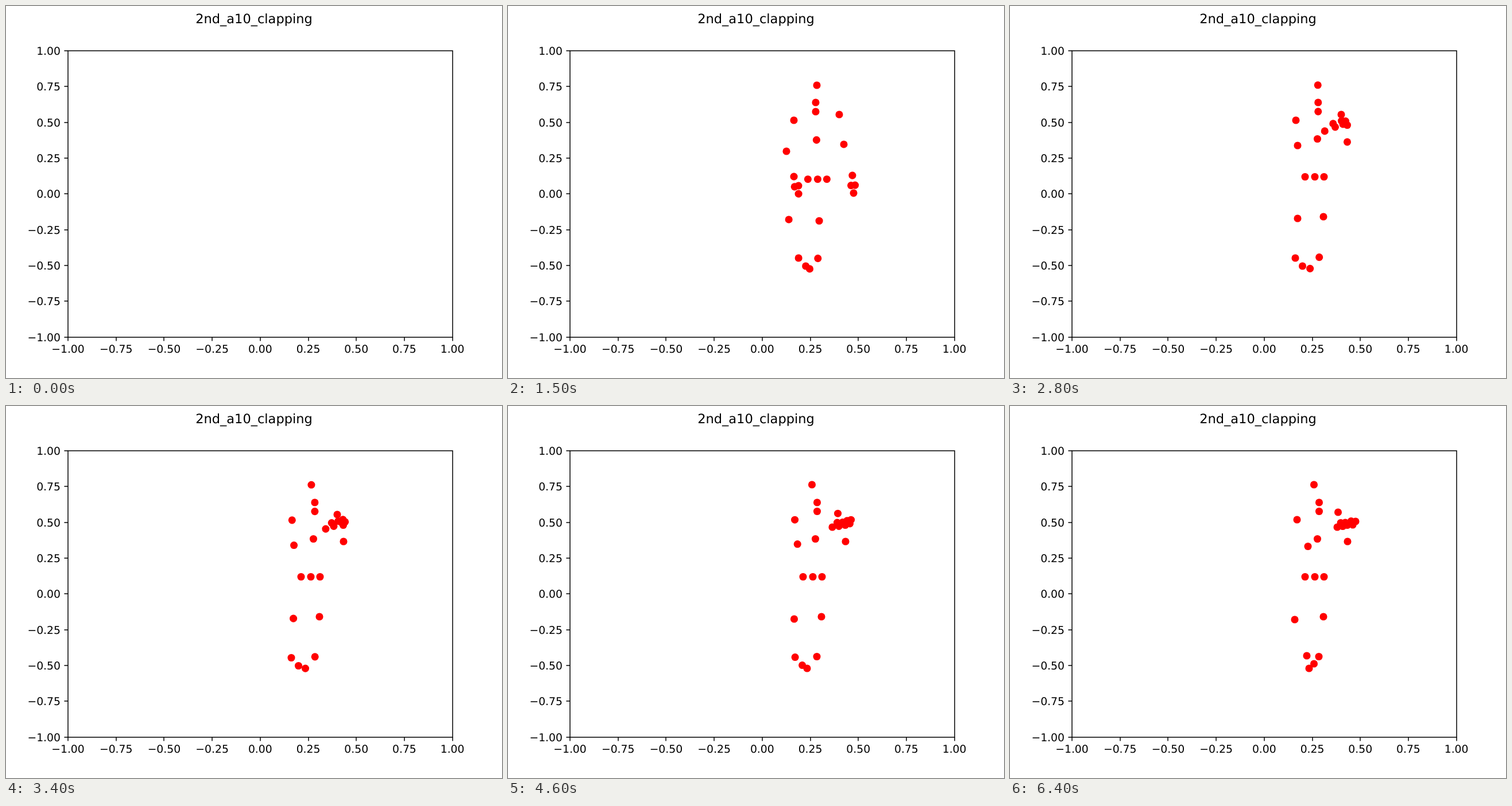
Animation of 864 by 648 pixels, one loop 6.5 s. Source, as an HTML page:

```html
<!DOCTYPE html>
<html lang="en">
<head>
<meta charset="utf-8">
<title>Motion plot</title>
<style>
  html, body { margin: 0; width: 100%; height: 100%; overflow: hidden; background: #fff; }
  svg { display: block; width: 864px; height: 648px; }
  text { font: 18.75px "DejaVu Sans", sans-serif; text-rendering: geometricPrecision; }
  .title { font-size: 22.5px; text-anchor: middle; }
  .axes { fill: none; stroke: #000; stroke-width: 1.5; }
  .joints { fill: #f00; }
</style>
</head>
<body>
<svg viewBox="0 0 864 648">
  <text class="title" x="432" y="30">2nd_a10_clapping</text>
  <g class="joints"></g>
  <g class="axes"><rect x="108" y="78" width="670" height="499"/></g>
  <g class="labels"></g>
</svg>
<script>
const LOOP = 6500, STEP = 100;
const $ = selector => document.querySelector(selector);

function add(parent, tag, attrs, content = "") {
  const node = document.createElementNS("http://www.w3.org/2000/svg", tag);
  for (const name in attrs) node.setAttribute(name, attrs[name]);
  node.textContent = content;
  parent.append(node);
  return node;
}

function drawAxes() {
  const axes = $(".axes"), labels = $(".labels");
  for (let i = 0; i <= 8; i++) {
    const value = (i / 4 - 1).toFixed(2).replace("-", "\u2212");
    const x = 108 + 83.7 * i, y = 576.72 - 62.37 * i;
    const tickX = Math.round(x), tickY = Math.round(y);
    add(axes, "path", { d: `M${tickX} 577v6.6M108 ${tickY}h-6.6` });
    add(labels, "text", { x, y: 604, "text-anchor": "middle" }, value);
    add(labels, "text", { x: 94.9, y: Math.round(y + 7), "text-anchor": "end" }, value);
  }
}

const mix = (a, b, p) => a.map((v, i) => v + (b[i] - v) * p);
const shift = (motion, dx, dy) => time => {
  const [x, y] = motion(time);
  return [x + dx, y + dy];
};

// Smooth move between two points within a span of time.
const glide = (from, to, start, end) => time => {
  const p = Math.min(1, Math.max(0, (time - start) / (end - start)));
  return mix(from, to, p * p * (3 - 2 * p));
};

// Smooth move through waypoints given as [time, x, y].
const path = (...points) => time => {
  const next = Math.max(1, points.findIndex(point => point[0] > time));
  const i = time >= points.at(-1)[0] ? points.length - 1 : next;
  const [start, ...from] = points[i - 1], [end, ...to] = points[i];
  return glide(from, to, start, end)(time);
};

// Palm and thumb lie either side of the line from wrist to tip.
function hand(wrist, tip) {
  const splayed = side => time => {
    const a = wrist(time), b = tip(time);
    const dx = b[0] - a[0], dy = b[1] - a[1];
    const spread = side * 3.5 / Math.hypot(dx, dy);
    return [a[0] + dx * 0.56 - dy * spread, a[1] + dy * 0.56 + dx * spread];
  };
  return [wrist, splayed(-1), splayed(1), tip];
}

const pelvis = glide([542, 303], [531, 297.5], 900, 2800);
const leftAnkle = path([900, 509, 439], [2800, 497, 439], [4000, 497, 438], [6400, 517, 435]);

const torso = [
  glide([538, 138], [529.5, 137], 2300, 4000),
  glide([536, 168], [538.5, 168], 2100, 4000),
  glide([536, 184], [538.5, 183.5], 2100, 4000),
  glide([498, 199], [500, 198], 2800, 5300),
  glide([577, 189], [571.5, 185], 4000, 5300),
  glide([538, 234], [535.5, 231.5], 900, 2800),
  ...[-17, 0, 16].map(dx => shift(pelvis, dx, 0))
];

const arms = [
  path([2100, 485, 253], [2800, 501, 243], [5300, 505, 240], [6400, 519, 244.5]),
  glide([585, 241], [588, 236], 1400, 3300),
  ...hand(
    path([1400, 498, 297], [2100, 499, 299.5], [2700, 548, 218], [4000, 564, 211], [6400, 570, 211]),
    path([1400, 506, 330], [2100, 508, 279], [2700, 577.5, 200], [5300, 584, 203])),
  ...hand(
    path([1400, 598, 296], [2100, 632, 280.5], [2700, 587.5, 207.5]),
    path([1400, 599, 328], [2100, 653.5, 289], [2700, 578, 200], [4000, 594, 196], [5300, 602, 201]))
];

const legs = [
  path([700, 492, 372], [1100, 471, 371], [1400, 489, 372], [2800, 501, 370], [6400, 496, 372]),
  glide([539, 380], [546, 367], 900, 2200),
  leftAnkle,
  shift(leftAnkle, 12.5, 14),
  glide([540, 440], [538, 436.5], 900, 4000),
  glide([526, 458], [521, 457], 900, 4000)
];

const joints = [...torso, ...arms, ...legs].map(motion => ({
  motion, dot: add($(".joints"), "circle", { r: 6.55 })
}));

const start = performance.now();
function render() {
  const elapsed = Math.max(0, performance.now() - start) % LOOP;
  const time = Math.floor(elapsed / STEP) * STEP;
  $(".joints").style.visibility = time < STEP ? "hidden" : "visible";
  for (const { motion, dot } of joints) {
    const [x, y] = motion(time);
    dot.setAttribute("cx", x);
    dot.setAttribute("cy", y);
  }
  requestAnimationFrame(render);
}

drawAxes();
render();
</script>
</body>
</html>
```
